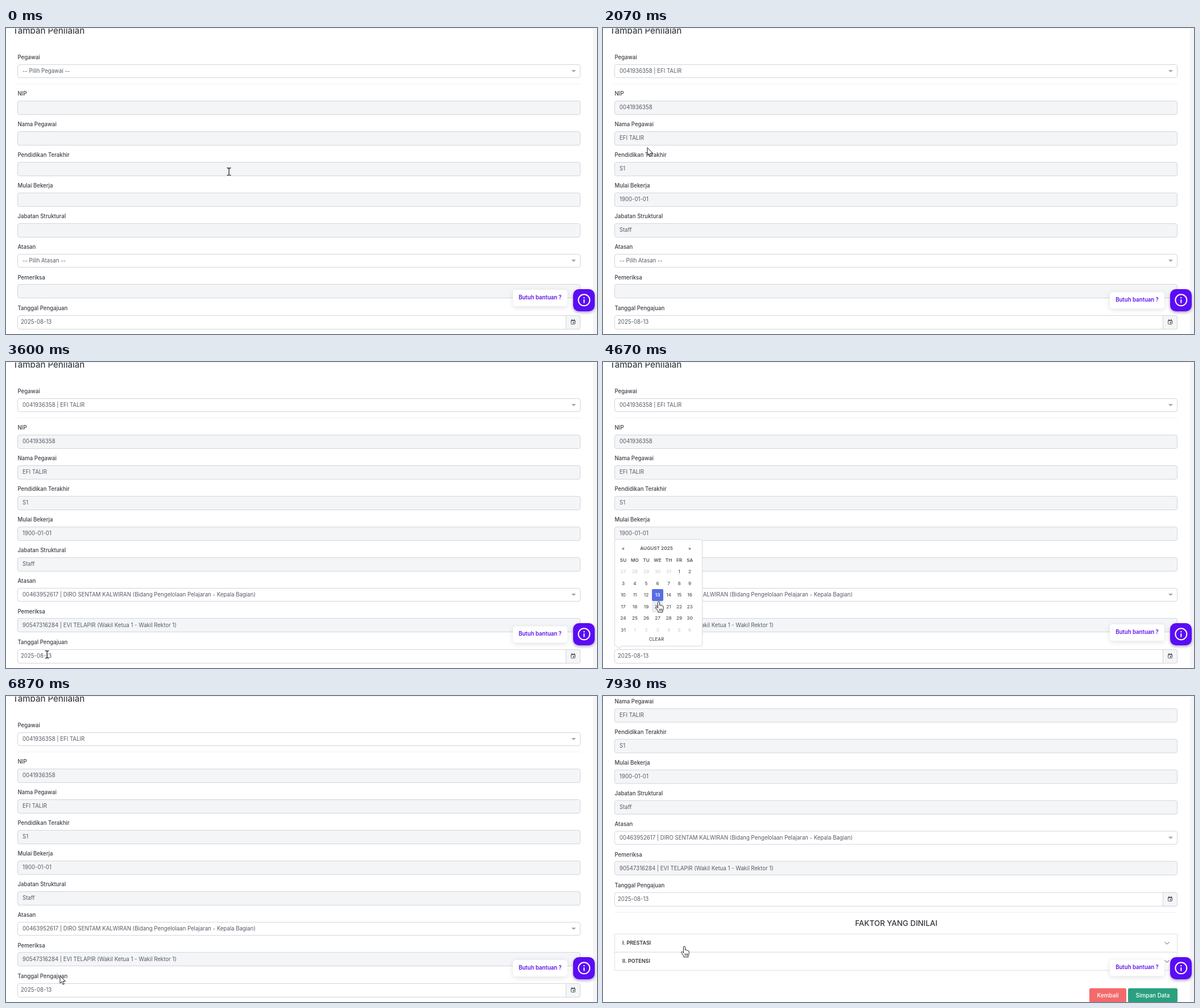
An HTML page that plays this animation: 1039 by 539 pixels, repeating every 8000 ms.

```html
<!DOCTYPE html>
<html lang="id">
<head>
<meta charset="utf-8">
<title>Tambah Penilaian</title>
<style>
html, body { margin: 0; width: 100%; height: 100%; overflow: hidden; background: #fff; }
#stage { position: relative; width: 1039px; height: 539px; overflow: hidden; background: #fff;
  font: 400 9.65px/14px Inter, "Open Sans", sans-serif; color: #565b64; }
#stage * { position: absolute; box-sizing: border-box; white-space: pre; }
#page { left: 0; top: 0; width: 1032px; height: 720px; }
#top { left: 0; top: 0; width: 1039px; height: 1px; background: #eff0f3; }
#side { left: 1032px; top: 0; width: 7px; height: 539px; background: #f5f5f8; }
.title { font-size: 15px; font-weight: 500; color: #3d4149; }
.label { font-weight: 500; color: #3b3f47; }
.mid { transform: translateX(-50%); }
.box { left: 20px; width: 990px; border: 1px solid #d1d5dc; border-radius: 4px; }
.off { background: #f4f5f7; }
.tri { left: 994px; width: 0; height: 0; border: 4.5px solid transparent; border-top-color: #a3a6ab; border-bottom: 0; }
.hr { left: 20px; width: 990px; height: 1px; background: #f0f0f2; }
.head { font-size: 13.3px; font-weight: 500; color: #30343b; }
.sec { font-size: 9px; font-weight: 600; color: #33373e; }
.panel { left: 20px; width: 990px; border: 1px solid #dfe1e5; }
.btn { height: 25px; border-radius: 3px; color: #fff; font-size: 9.9px; line-height: 25px; text-align: center; font-weight: 500; }
#cal { left: 20px; top: 312px; width: 155px; height: 189px; background: #fff; border: 1px solid #d6d8dc;
  border-radius: 4px; font-size: 8.2px; font-weight: 500; color: #53565d; }
#cal .b { font-weight: 600; }
#cal .old { color: #c6c8cc; font-weight: 400; }
#cal .cell { width: 20.5px; height: 20.5px; line-height: 20px; text-align: center; border-radius: 2px; }
#cal .hov { background: #ececee; }
#cal .sel { background: #556ee6; color: #fff; font-weight: 600; }
#cal .tip { left: 4px; top: 184px; width: 7px; height: 7px; background: #fff; transform: rotate(45deg);
  border: solid #d6d8dc; border-width: 0 1px 1px 0; }
#clear { left: 5px; top: 169px; width: 136px; height: 13px; line-height: 13px; text-align: center; border-radius: 3px; }
#caret { left: 81px; top: 512px; width: 1px; height: 12px; background: #444; }
#bubble { left: 891px; top: 461px; width: 96px; height: 29px; border-radius: 5px; background: #fff;
  box-shadow: 0 2px 8px rgba(40, 40, 70, .14); color: #5c14ea; font-weight: 600; line-height: 28px; text-align: center; }
#help { left: 996.5px; top: 460px; width: 38.5px; height: 38.5px; border-radius: 10.5px; background: #5b0cf5;
  box-shadow: 0 2px 5px rgba(50, 30, 120, .45); }
svg { overflow: visible; left: 0; top: 0; }
</style>
</head>
<body>
<div id="stage">
  <div id="page"></div>
  <div id="top"></div>
  <div id="side"></div>
  <div id="bubble">Butuh bantuan ?</div>
  <div id="help">
    <svg width="38" height="38" fill="none" stroke="#fff" stroke-width="2">
      <circle cx="19.3" cy="19.3" r="10"/>
      <path d="M19.3 18.3v6.2M19.3 14v2.2"/>
    </svg>
  </div>
  <svg id="cursor" width="20" height="20" stroke-linejoin="round" stroke-linecap="round">
    <g id="beam" fill="none">
      <path d="M-3-6.5Q-.5-6.5 0-5.5Q.5-6.5 3-6.5M0-5.5V5.5M-3 6.5Q-.5 6.5 0 5.5Q.5 6.5 3 6.5" stroke="#fff" stroke-width="2.6"/>
      <path d="M-3-6.5Q-.5-6.5 0-5.5Q.5-6.5 3-6.5M0-5.5V5.5M-3 6.5Q-.5 6.5 0 5.5Q.5 6.5 3 6.5" stroke="#222" stroke-width="1.3"/>
    </g>
    <path id="arrow" d="M0 0V13L3 10.3L5.1 15.2L7.3 14.2L5.2 9.5H9Z" fill="#fff" stroke="#222"/>
    <path id="hand" d="M-1.7 1.4Q-1.7 0 0 0Q1.5 0 1.5 1.4V6.3Q3.4 5.4 4 6.9Q5.8 6.2 6.2 7.8Q8.2 7.4 8.2 9.4V12.5Q8.2 15 6.8 16.4V18.8H-1.2V16.8L-5 11.5Q-6 9.8-4.6 9.4Q-3.4 9.1-1.7 11.2ZM1.2 13V16M3.4 13V16M5.5 13V16" fill="#fff" stroke="#222"/>
  </svg>
</div>
<script>
const $ = id => document.getElementById(id);
const page = $('page');

function add(parent, cls, text, style = {}) {
  const el = document.createElement('div');
  el.className = cls;
  el.textContent = text;
  for (const k in style) el.style[k] = style[k] + 'px';
  parent.append(el);
  return el;
}
const write = (parent, x, y, text, cls = '') => add(parent, cls, text, { left: x, top: y - 7 });
const show = (el, on) => { el.style.display = on ? '' : 'none'; };
const set = (el, text) => { if (el.textContent !== text) el.textContent = text; };

// Form
const id = '0041936358', person = 'EFI TALIR';
write(page, 12, 4.5, 'Tambah Penilaian', 'title');
add(page, 'hr', '', { top: 98 });

function field(y, label, kind, x = 29) {
  const pick = kind === 'pick';
  write(page, 20.5, y - 24, label, 'label');
  add(page, 'box ' + kind, '', { top: y - 12.5, height: pick ? 24 : 25 });
  if (pick) add(page, 'tri', '', { top: y - 2 });
  return write(page, x, y, '');
}
const pegawai = field(76, 'Pegawai', 'pick');
const details = [
  [field(140, 'NIP', 'off'), id],
  [field(194, 'Nama Pegawai', 'off'), person],
  [field(248, 'Pendidikan Terakhir', 'off'), 'S1'],
  [field(302, 'Mulai Bekerja', 'off'), '1900-01-01'],
  [field(356, 'Jabatan Struktural', 'off'), 'Staff']
];
const atasan = field(410, 'Atasan', 'pick');
const pemeriksa = field(463.5, 'Pemeriksa', 'off');
const date = field(518, 'Tanggal Pengajuan', '', 26);

add(page, 'box off', '', { left: 984, top: 505.5, width: 26, height: 25 }).style.borderRadius = '0 4px 4px 0';
page.insertAdjacentHTML('beforeend', `<svg width="1032" height="700" fill="none" stroke="#4b4f57">
  <rect x="993.5" y="515" width="7" height="6.6" rx="1"/>
  <path d="M993.5 515.6h7M995 513v2M999 513v2" stroke-width="1.4"/>
  <rect x="997" y="518" width="2" height="2" fill="#4b4f57" stroke="none"/>
  <path d="M987.5 593.5l4 4l4-4M987.5 625.8l4 4l4-4"/></svg>`);

// Lower part, reached by scrolling
add(page, 'hr', '', { top: 541 });
write(page, 515.5, 560.3, 'FAKTOR YANG DINILAI', 'head mid');
add(page, 'panel', '', { top: 579, height: 33 });
add(page, 'panel', '', { top: 611, height: 33 });
write(page, 34, 595.4, 'I. PRESTASI', 'sec');
write(page, 34, 627.4, 'II. POTENSI', 'sec');
add(page, 'btn', 'Kembali', { left: 855, top: 674.5, width: 65 }).style.background = '#f46a6c';
add(page, 'btn', 'Simpan Data', { left: 923, top: 674.5, width: 87 }).style.background = '#29a17e';

const caret = add(page, '', '');
caret.id = 'caret';

// Calendar
const cal = add(page, '', '');
cal.id = 'cal';
const cols = [14.5, 35, 55, 75, 94.5, 113, 131.5];
write(cal, 14.5, 15, '«', 'mid');
write(cal, 73, 15, 'AUGUST 2025', 'mid b');
write(cal, 131.5, 15, '»', 'mid');
['SU', 'MO', 'TU', 'WE', 'TH', 'FR', 'SA'].forEach((d, i) => write(cal, cols[i], 35.5, d, 'mid b'));
const days = {};
for (let i = 0; i < 42; i++) {
  const n = i - 4, inside = n > 0 && n < 32;
  const label = n < 1 ? n + 31 : n > 31 ? n - 31 : n;
  const el = add(cal, 'cell' + (inside ? '' : ' old'), label,
    { left: cols[i % 7] - 10.2, top: 46 + Math.floor(i / 7) * 20.5 });
  if (inside) days[n] = el;
}
add(cal, 'tip', '');
const clear = add(cal, '', 'CLEAR');
clear.id = 'clear';

// Pointer path: time, x, y, shape
const path = [
  [0, 392, 253, 'beam'], [70, 392, 253, 'beam'], [300, 260, 150, 'arrow'], [560, 150, 77, 'arrow'],
  [1000, 150, 77, 'arrow'], [1450, 86, 147, 'arrow'], [1800, 83, 146, 'arrow'], [2070, 78, 211, 'arrow'],
  [2600, 70, 404, 'arrow'], [3100, 72, 412, 'arrow'], [3400, 72, 507, 'beam'], [3530, 72, 515, 'beam'],
  [3850, 73, 516, 'beam'], [4000, 80, 490, 'hand'], [4500, 98, 424, 'hand'], [4670, 98, 422, 'hand'],
  [4950, 98, 424, 'hand'], [5200, 84, 512, 'beam'], [5640, 82, 516, 'beam'], [5700, 86, 492, 'hand'],
  [5800, 91, 470.5, 'hand'], [6150, 97, 412, 'hand'], [6480, 97, 410, 'arrow'], [6850, 95, 493, 'arrow'],
  [7600, 95, 493, 'arrow'], [7740, 102, 450, 'hand'], [7800, 110, 442, 'hand'], [7930, 143, 441, 'hand'],
  [8000, 143, 441, 'hand']
];
const ease = p => p * p * (3 - 2 * p);
const ramp = (t, a, b) => ease(Math.min(1, Math.max(0, (t - a) / (b - a))));

function pointer(t) {
  let i = 0;
  while (i < path.length - 2 && t >= path[i + 1][0]) i++;
  const [t0, x0, y0, shape] = path[i], [t1, x1, y1] = path[i + 1];
  const p = ramp(t, t0, t1);
  $('cursor').style.transform = `translate(${x0 + (x1 - x0) * p}px, ${y0 + (y1 - y0) * p}px)`;
  for (const s of ['beam', 'arrow', 'hand']) show($(s), s === shape);
}

function render(t) {
  const chosen = t >= 1700, boss = t >= 3100;
  set(pegawai, chosen ? `${id} | ${person}` : '-- Pilih Pegawai --');
  for (const [el, value] of details) set(el, chosen ? value : '');
  set(atasan, boss ? '00463952617 | DIRO SENTAM KALWIRAN (Bidang Pengelolaan Pelajaran - Kepala Bagian)' : '-- Pilih Atasan --');
  set(pemeriksa, boss ? '90547316284 | EVI TELAPIR (Wakil Ketua 1 - Wakil Rektor 1)' : '');

  const day = t >= 4900 && t < 6450 ? 20 : 13;
  const again = t >= 5500 && t < 6450;
  set(date, '2025-08-' + day);
  show(caret, again);
  show(cal, again || (t >= 3750 && t < 4930));
  cal.style.top = again ? '312.8px' : '312px';
  for (const n of [13, 20]) days[n].classList.toggle('sel', n === day);
  days[20].classList.toggle('hov', t >= 4400 && t < 4900);
  days[13].classList.toggle('hov', t >= 6100 && t < 6450);
  clear.classList.toggle('hov', t >= 5670 && t < 5850);

  const scroll = 80 * ramp(t, 7030, 7180) + 80.3 * ramp(t, 7340, 7500);
  page.style.transform = `translateY(${-scroll}px)`;
  const bob = 2.3 * (1 - Math.cos(2 * Math.PI * (t / 1500 + 0.04)));
  $('bubble').style.transform = `translateY(${bob}px)`;
  pointer(t);
}

const start = performance.now();
function tick() {
  render((performance.now() - start) % 8000);
  requestAnimationFrame(tick);
}
tick();
</script>
</body>
</html>
```
